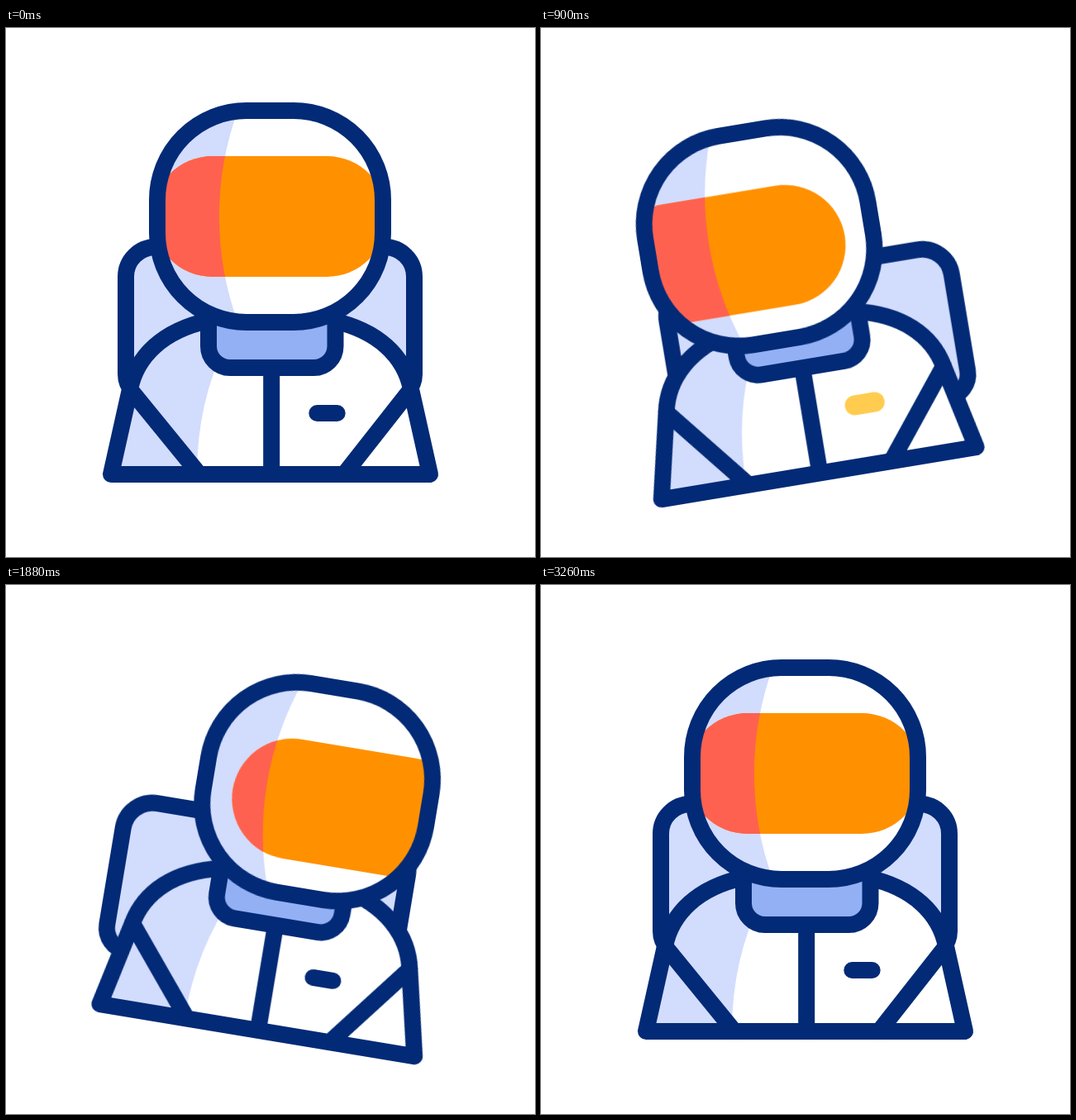
Animation of 640 by 640 pixels, one loop 3.6 s. Source, as an HTML page:

```html
<!DOCTYPE html>
<html lang="en">
<head>
<meta charset="utf-8">
<title>Astronaut</title>
<style>
  @property --x { syntax: "<number>"; inherits: true; initial-value: 0; }
  @property --y { syntax: "<number>"; inherits: true; initial-value: 0; }

  html, body { margin: 0; width: 100%; height: 100%; overflow: hidden; background: #fff; }

  svg {
    display: block; width: 100vw; height: 100vh;
    animation: sway 3.6s infinite, dip 3.6s infinite;
  }

  .line { fill: none; stroke: #032a76; stroke-width: 20; stroke-linecap: round; stroke-linejoin: round; }
  .white { fill: #fff; }
  .shade { fill: #d2dcfd; }
  .collar { fill: #92b0f3; }
  .glass { fill: #ff9100; }
  .dark { fill: #ff6150; }

  .suit { transform-origin: 320px 441px; animation: tilt 3.6s infinite; }
  .head { transform: translate(calc(var(--x) * 1px), calc(var(--y) * 1px)); }
  .visor { transform: translate(calc(var(--x) * 1.65px), calc(var(--y) * .88px)); }
  .pack { transform: translate(calc(var(--x) * -1px), calc(var(--y) * 1.56px)); }
  .shine { animation: shine 3.6s infinite; }
  .lamp { animation: lamp 3.6s step-end infinite; }

  @keyframes tilt {
    0% { transform: rotate(0deg); animation-timing-function: cubic-bezier(.56, 0, .81, 1); }
    21.39% { transform: rotate(-10deg); animation-timing-function: cubic-bezier(.57, 0, .46, 1); }
    45% { transform: rotate(10deg); animation-timing-function: cubic-bezier(.47, 0, .17, 1); }
    90.28%, 100% { transform: rotate(0deg); }
  }
  @keyframes sway {
    0% { --x: 0; animation-timing-function: cubic-bezier(.333, 0, .667, 1); }
    21.39% { --x: -26; animation-timing-function: cubic-bezier(.45, 0, .58, 1); }
    45% { --x: 26; animation-timing-function: cubic-bezier(.56, 0, .14, 1); }
    90.28%, 100% { --x: 0; }
  }
  @keyframes dip {
    0% { --y: 0; animation-timing-function: cubic-bezier(.4, 0, .667, 1); }
    22.22% { --y: 16; animation-timing-function: cubic-bezier(.2, .6, .4, 1); }
    33.61% { --y: 19; animation-timing-function: cubic-bezier(.6, 0, .8, .4); }
    45% { --y: 16; animation-timing-function: cubic-bezier(.56, 0, .14, 1); }
    90.28%, 100% { --y: 0; }
  }
  @keyframes shine {
    0% { transform: translateX(-180px); animation-timing-function: cubic-bezier(.333, 0, .667, 1); }
    21.1% { transform: translateX(180px); animation-timing-function: step-end; }
    25.56% { transform: translateX(-180px); animation-timing-function: cubic-bezier(.333, 0, .667, 1); }
    46.39%, 100% { transform: translateX(180px); }
  }
  @keyframes lamp {
    0%, 37.78%, 75.56%, 100% { stroke: #032a76; stroke-width: 20px; }
    18.89%, 56.67% { stroke: #ffcc50; stroke-width: 24px; }
  }
</style>
</head>
<body>
<svg viewBox="0 0 640 640">
  <defs>
    <rect id="helmet" x="183" y="100" width="273" height="256" rx="108"/>
    <rect id="glass" x="177" y="155" width="284" height="146" rx="73"/>
    <path id="torso" d="M127 540 L150 437 C158 397 190 366 245 354 H395 C450 366 482 397 490 437 L513 540 Z"/>
    <path id="pack" d="M181 265 H458 a36 36 0 0 1 36 36 V419 a29 29 0 0 1 -29 29 H174 a29 29 0 0 1 -29 -29 V301 a36 36 0 0 1 36 -36 Z"/>
    <path id="collar" d="M245 355 V385 a26 26 0 0 0 26 26 H372.5 a26 26 0 0 0 26 -26 V355"/>
    <path id="side" d="M280.4 100 A376 376 0 0 0 280.4 356 H150 V100 Z"/>
    <clipPath id="inHelmet"><use href="#helmet"/></clipPath>
    <clipPath id="inGlass"><use href="#glass"/></clipPath>
    <clipPath id="inTorso"><use href="#torso"/></clipPath>
    <clipPath id="inSide"><use href="#side"/></clipPath>
  </defs>

  <g class="suit">
    <g class="pack">
      <use href="#pack" class="shade"/>
      <use href="#pack" class="line"/>
    </g>

    <use href="#torso" class="white"/>
    <path class="shade" clip-path="url(#inTorso)" d="M267 340 V380 Q230 455 231 545 H100 V340 Z"/>
    <use href="#torso" class="line"/>
    <path class="line" d="M150 437 L234 540 M490 437 L409 540 M321.2 411 V540"/>
    <path class="line lamp" d="M376.3 466 H400.7"/>

    <use href="#collar" class="collar"/>
    <use href="#collar" class="line"/>

    <g class="head">
      <use href="#helmet" class="white"/>
      <g clip-path="url(#inHelmet)">
        <use href="#side" class="shade"/>
        <g class="visor"><use href="#glass" class="glass"/></g>
        <g clip-path="url(#inSide)">
          <g class="visor"><use href="#glass" class="dark"/></g>
        </g>
        <g class="visor">
          <g clip-path="url(#inGlass)">
            <path class="white shine" d="M325 153 H346 L311 303 H290 Z"/>
          </g>
        </g>
      </g>
      <use href="#helmet" class="line"/>
    </g>
  </g>
</svg>
</body>
</html>
```
